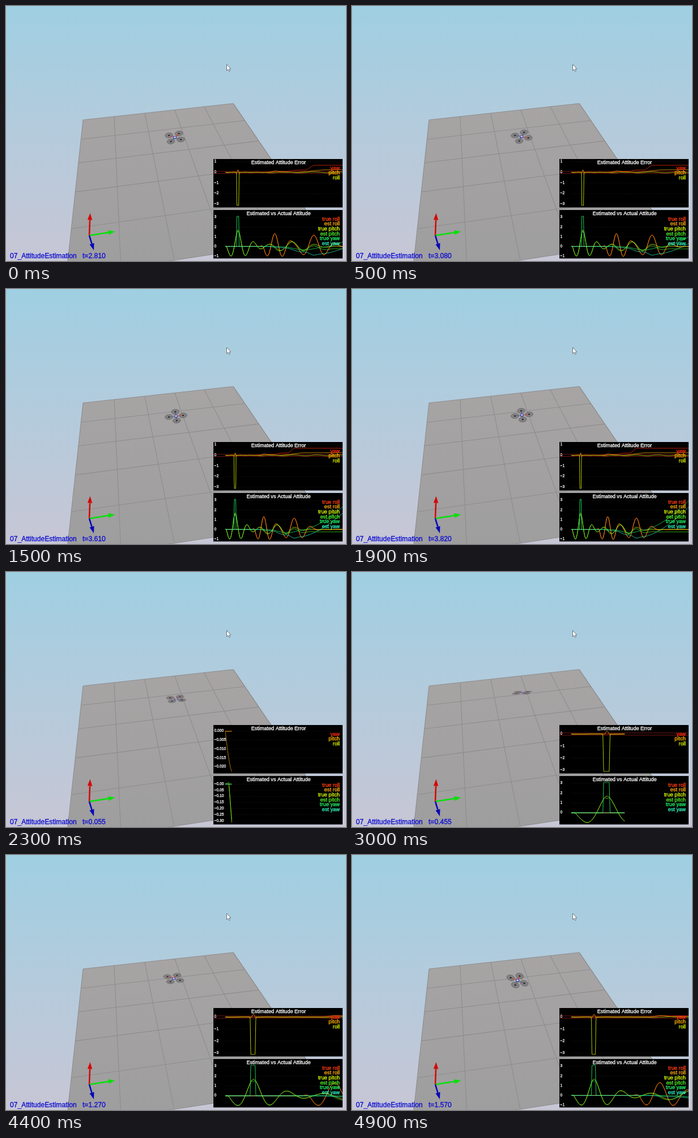
These frames come from a looping animation (600x450 px, 5000 ms). An HTML page with a canvas:

```html
<!DOCTYPE html>
<html lang="en">
<head>
<meta charset="utf-8">
<title>Attitude estimation</title>
<style>
html, body { margin: 0; width: 100%; height: 100%; overflow: hidden; background: #b8cbda; }
canvas { display: block; width: 600px; height: 450px; }
</style>
</head>
<body>
<canvas id="stage" width="600" height="450"></canvas>
<script>
const ctx = document.getElementById('stage').getContext('2d');
const FONT = '"Liberation Sans", Arial, sans-serif';
const LOOP = 5000, STEP = 100, RESET = 2200;

const { sin, cos, exp, PI } = Math;
const clamp = (v, a, b) => Math.min(b, Math.max(a, v));
const smooth = (a, b, t) => { const u = clamp((t - a) / (b - a), 0, 1); return u * u * (3 - 2 * u); };
const gauss = (t, mid, width) => exp(-(((t - mid) / width) ** 2));
const packet = (t, mid, width, period) => gauss(t, mid, width) * cos(2 * PI * (t - mid) / period);

// Simulation clock: the tail of one run, then a fresh run
function simTime(ms) {
  const late = ms / 1000, fresh = (ms - 2300) / 1000;
  const t = ms < RESET
    ? 2.81 + .542 * late - .006 * late * late
    : .055 + .5645 * fresh + .0068 * fresh * fresh;
  return Math.max(0, Math.round(t * 200) / 200);
}

// Attitude signals in radians
const swing = t => {
  const away = Math.hypot(t - .3, .02) - .02;
  return t < .03 ? 0 : -1.7 * exp(-away / .28) * sin(2 * PI * (t - .03) / .37);
};
const ripple = t => .5 * smooth(.9, 1.2, t) * packet(t, 1.6, .6, .55);
const pitch = t => swing(t) + ripple(t);
const roll = t => smooth(.82, .96, t) * (1.32 * packet(t, 1.185, .33, .38) + 1.15 * packet(t, 2.12, .45, .52));
const yaw = t => Math.min(PI, 1.75 * Math.max(0, t - 2.4) ** 1.5) - .35 * gauss(t, 1.9, .35);

// Past vertical the estimate folds back and one angle flips by half a turn
const flip = t => smooth(.268, .277, t) - smooth(.322, .332, t);
const fold = t => Math.max(0, 2 * pitch(t) - PI);
const pitchErr = t => fold(t) - .025 * sin(23 * t) * exp(-t) + .13 * gauss(t, 1.2, .1) + .25 * smooth(1.6, 2.5, t);
const rollNoise = t => -.04 * sin(9 * (t - .9)) * smooth(.9, 1.1, t);
const rollErr = t => rollNoise(t) - 3.12 * flip(t);
const yawErr = t => .1 * smooth(1.05, 1.25, t) + .12 * smooth(1.5, 1.75, t) + .45 * smooth(1.9, 2.15, t);

const panels = [
  {
    y: 270, title: 'Estimated Attitude Error', limits: [-.1, .1],
    series: [
      ['yaw', '#ff2c10', yawErr],
      ['pitch', '#ffb400', pitchErr],
      ['roll', '#d8f000', rollErr]
    ]
  },
  {
    y: 360, title: 'Estimated vs Actual Attitude', limits: [], negZero: true,
    series: [
      ['true roll', '#ff3c10', t => roll(t) + rollNoise(t)],
      ['est roll', '#ffa810', roll],
      ['true pitch', '#dcff00', pitch],
      ['est pitch', '#50f028', t => pitch(t) - pitchErr(t)],
      ['true yaw', '#20f868', t => yaw(t) + 3.12 * flip(t)],
      ['est yaw', '#30f8c0', t => yaw(t) - yawErr(t)]
    ]
  }
];

function line(color, width, ...p) {
  ctx.strokeStyle = color;
  ctx.lineWidth = width;
  ctx.beginPath();
  for (let i = 0; i < p.length; i += 2) ctx.lineTo(p[i], p[i + 1]);
  ctx.stroke();
}

function shape(fill, ...p) {
  ctx.fillStyle = fill;
  ctx.beginPath();
  for (let i = 0; i < p.length; i += 2) ctx.lineTo(p[i], p[i + 1]);
  ctx.closePath();
  ctx.fill();
}

function disc(x, y, r, fill) {
  ctx.beginPath();
  ctx.arc(x, y, r, 0, 2 * PI);
  ctx.fillStyle = fill;
  ctx.fill();
}

function text(s, x, y, size, color, align = 'left') {
  ctx.font = size + 'px ' + FONT;
  ctx.textAlign = align;
  ctx.fillStyle = ctx.strokeStyle = color;
  ctx.lineWidth = .35;
  ctx.fillText(s, x, y);
  ctx.strokeText(s, x, y);
}

function fade(y0, y1, ...colors) {
  const g = ctx.createLinearGradient(0, y0, 0, y1);
  colors.forEach((c, i) => g.addColorStop(i / (colors.length - 1), c));
  return g;
}

function sky() {
  ctx.fillStyle = fade(0, 450, '#9fcfe2', '#b4cbdc', '#c7c6d5');
  ctx.fillRect(0, 0, 600, 450);
}

// Perspective map from the unit square to the floor
const floorPoint = (() => {
  const [ax, ay, bx, by, cx, cy, dx, dy] = [136, 201, 401, 172, 562, 408, 106, 478];
  const ex = bx - cx, ey = by - cy, fx = dx - cx, fy = dy - cy;
  const sx = ax - bx + cx - dx, sy = ay - by + cy - dy, den = ex * fy - fx * ey;
  const g = (sx * fy - fx * sy) / den, h = (ex * sy - sx * ey) / den;
  return (u, v) => {
    const w = 1 + g * u + h * v;
    return [
      (ax + (bx * (1 + g) - ax) * u + (dx * (1 + h) - ax) * v) / w,
      (ay + (by * (1 + g) - ay) * u + (dy * (1 + h) - ay) * v) / w
    ];
  };
})();

function ground() {
  const corners = [...floorPoint(0, 0), ...floorPoint(1, 0), ...floorPoint(1, 1), ...floorPoint(0, 1)];
  shape(fade(172, 450, '#a7a4a4', '#9f9e9f'), ...corners);
  for (let i = 0; i <= 1; i += .2) {
    line('#8e8d8e', 1.1, ...floorPoint(i, 0), ...floorPoint(i, 1));
    line('#8e8d8e', 1.1, ...floorPoint(0, i), ...floorPoint(1, i));
  }
  line('#8e8d8e', 1.1, ...floorPoint(1, 0), ...floorPoint(1, 1));
}

function arrow(color, x0, y0, x1, y1) {
  const d = Math.hypot(x1 - x0, y1 - y0), ux = (x1 - x0) / d, uy = (y1 - y0) / d;
  const bx = x1 - ux * 12, by = y1 - uy * 12;
  line(color, 2.6, x0, y0, bx, by);
  shape(color, x1, y1, bx - uy * 4.2, by + ux * 4.2, bx + uy * 4.2, by - ux * 4.2);
}

function drone(t) {
  const x = 300 - 8 * gauss(t, 1.6, .4) - 2 * gauss(t, 2.75, .3);
  const y = 224 - 11 * smooth(.05, .4, t) + 19 * smooth(.5, 2.8, t) - 10 * smooth(2.8, 4, t);
  const heading = 56 + 16 * gauss(t, 1.57, .3) + 40 * smooth(2.8, 3.5, t);
  const view = sin(.68 + swing(t) + .3 * ripple(t));
  const flat = Math.max(.14, Math.abs(view)) * (view < 0 ? -1 : 1);
  const rotors = [0, 1, 2, 3].map(i => {
    const a = heading * PI / 180 + i * PI / 2;
    return [12.6 * cos(a), -12.6 * sin(a)];
  });
  const front = t < 3.05 ? [0, 1] : [3];
  ctx.save();
  ctx.transform(1, .38 * roll(t) - .05, 0, flat, x, y);
  rotors.forEach(([rx, ry]) => {
    disc(rx, ry, 6.9, 'rgba(118,118,120,.75)');
    ctx.strokeStyle = '#626264';
    ctx.lineWidth = .9;
    ctx.stroke();
  });
  rotors.forEach(([rx, ry], i) => {
    line(front.includes(i) ? '#d8402c' : '#66666c', 1.6, 0, 0, rx * .85, ry * .85);
    disc(rx, ry, 1.8, '#28222c');
  });
  ctx.fillStyle = '#2c3cb4';
  ctx.fillRect(-2.8, -3.5, 5.6, 7);
  ctx.fillStyle = '#dde2f6';
  ctx.fillRect(-1.7, -2.2, 3.4, 3.6);
  ctx.restore();
}

function tickStep(range) {
  const base = 10 ** Math.floor(Math.log10(range));
  return [5, 2, 1, .5, .2, .1].map(k => k * base).find(s => range / s >= 3.3);
}

function panel(p, now) {
  const left = 387, right = 594, top = p.y + 11, height = 71, samples = 500;
  const rows = p.series.map(([, , f]) => Array.from({ length: samples + 1 }, (_, i) => f(now * i / samples)));
  const lo = Math.min(0, ...rows.flat()), hi = Math.max(0, ...rows.flat());
  const range = Math.max(hi - lo, 1e-4);
  const py = v => top + (hi - v) / range * height;
  const dx = (right - left) / Math.max(now, 1) * now / samples;

  ctx.save();
  ctx.beginPath();
  ctx.rect(366, p.y, 228, 85.6);
  ctx.fillStyle = '#000';
  ctx.fill();
  ctx.clip();

  const step = tickStep(range), digits = Math.max(0, -Math.floor(Math.log10(step) + 1e-9));
  for (let k = Math.ceil(lo / step - 1e-6); py(k * step) > p.y + 4; k++) {
    const y = py(k * step);
    ctx.setLineDash([1, 2]);
    line('#1c1c1c', 1, left, y, right, y);
    ctx.setLineDash([]);
    const sign = k < 0 || (!k && digits && p.negZero) ? '\u2212' : '';
    text(sign + Math.abs(k * step).toFixed(digits), 367.5, y + 1.4, 6.7, '#f0f0f0');
  }
  p.limits.filter(v => v > lo && v < hi).forEach(v => line('#701414', 1, 366, py(v), right, py(v)));

  ctx.lineJoin = 'round';
  ctx.globalAlpha = .82;
  rows.forEach((row, s) => line(p.series[s][1], 1, ...row.flatMap((v, i) => [left + i * dx, py(v)])));
  ctx.restore();

  text(p.title, 481, p.y + 9.2, 9.1, '#fff', 'center');
  p.series.forEach(([name, color], i) => text(name, 589, p.y + 18.8 + i * 8.6, 9.3, color, 'right'));
}

function cursor() {
  const p = [389.5, 103, 389.5, 114, 392, 111.8, 393.8, 115.5, 395.5, 114.7, 393.8, 111.2, 396.8, 111];
  shape('#fff', ...p);
  line('#50565c', .8, ...p, 389.5, 103);
}

function draw(ms) {
  const t = simTime(ms);
  sky();
  ground();
  drone(t);
  arrow('#d40808', 147, 405, 148.5, 365.5);
  arrow('#08e008', 147, 405, 192.5, 398);
  arrow('#0808b8', 147, 405, 155, 431);
  panels.forEach(p => panel(p, t));
  text('07_AttitudeEstimation', 7, 444.8, 12.1, '#1010d0');
  text('t=' + t.toFixed(3), 135, 444.8, 12.1, '#1010d0');
  cursor();
}

const start = performance.now();
function tick() {
  const ms = Math.max(0, performance.now() - start) % LOOP;
  draw(Math.floor(ms / STEP) * STEP);
  requestAnimationFrame(tick);
}
tick();
</script>
</body>
</html>
```
